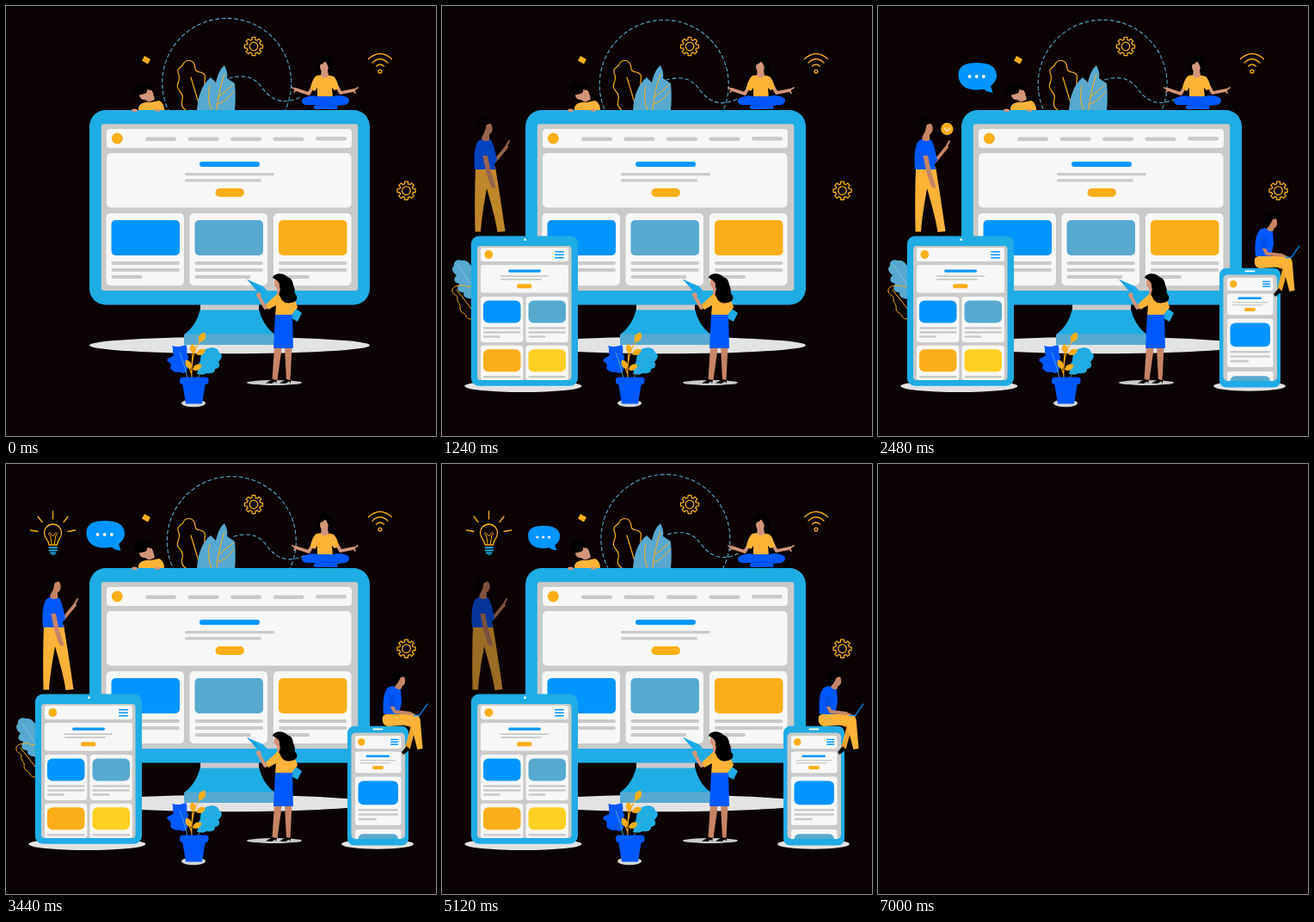
An HTML page that plays this animation: 500x500 px, repeating every 7.04 s.

```html
<!DOCTYPE html>
<html lang="en">
<head>
<meta charset="utf-8">
<title>Responsive design</title>
<style>
html, body { margin: 0; width: 100%; height: 100%; overflow: hidden; background: #0b0203; }
svg { display: block; width: 100vw; height: 100vh; }
</style>
</head>
<body>
<svg id="stage" viewBox="0 0 500 500"></svg>
<script>
const LOOP = 7040, STEP = 40;
const CYAN = '#20ace4', TEAL = '#57a9cf', SKY = '#0095ff', BLUE = '#0059ff', GOLD = '#fbae17',
  AMBER = '#fdb338', GREY = '#cacaca', PAPER = '#f7f7f7', SHADE = '#e3e3e3',
  SKIN = '#d3957a', TAN = '#c68566', HAIR = '#000';

// Shape helpers; boxes are given by their edges
const box = (x1, y1, x2, y2, fill, r = 0) =>
  `<rect x="${x1}" y="${y1}" width="${x2 - x1}" height="${y2 - y1}" rx="${r}" fill="${fill}"/>`;
const pill = (x1, y1, x2, y2, fill = GREY) => box(x1, y1, x2, y2, fill, (y2 - y1) / 2);
const oval = (x, y, rx, ry, fill) => `<ellipse cx="${x}" cy="${y}" rx="${rx}" ry="${ry}" fill="${fill}"/>`;
const dot = (x, y, r, fill) => oval(x, y, r, r, fill);
const ring = (x, y, r) => `<circle cx="${x}" cy="${y}" r="${r}" fill="none" stroke="${GOLD}" stroke-width="1.3"/>`;
const shape = (d, fill) => `<path d="${d}" fill="${fill}"/>`;
const line = (d, color, w = 1.2, extra = '') =>
  `<path d="${d}" fill="none" stroke="${color}" stroke-width="${w}" stroke-linecap="round" stroke-linejoin="round" ${extra}/>`;
const group = (id, ...parts) => `<g id="${id}">${parts.join('')}</g>`;

function gear(cx, cy) {
  const pts = [];
  for (let i = 0; i < 8; i++) {
    for (const [da, r] of [[-15, 8], [-10, 10.7], [10, 10.7], [15, 8]]) {
      const a = (i * 45 + da) * Math.PI / 180;
      pts.push(`${(cx + r * Math.cos(a)).toFixed(2)} ${(cy + r * Math.sin(a)).toFixed(2)}`);
    }
  }
  return line(`M${pts.join('L')}Z`, GOLD, 1.3) + ring(cx, cy, 4.8);
}

const leaf = (x, y, angle, len, w, fill) =>
  `<path transform="translate(${x} ${y}) rotate(${angle})" fill="${fill}"
    d="M0 0C${-w} ${-len * .3} ${-w} ${-len * .7} 0 ${-len}C${w} ${-len * .7} ${w} ${-len * .3} 0 0Z"/>`;

const menu = (x1, x2, y, gap) => [0, 1, 2].map(i => pill(x1, y + i * gap, x2, y + 1.4 + i * gap, SKY)).join('');

const orbit = () => group('orbit',
  line('M193 124A75 75 0 1 1 326 124', TEAL, 1.1, 'stroke-dasharray="4 3.4"'),
  line('M262 84C280 79 291 83 299 93C309 107 322 117 345 106', TEAL, 1.1, 'stroke-dasharray="4 3.4"'));

const backLeaves = () =>
  line('M209 121C198 113 211 108 202 99C195 91 204 88 201 80C197 72 204 72 206 68C208 62 217 62 219 68C221 72 218 76 226 77C235 79 230 85 231 91C233 99 225 101 228 107C231 113 225 117 224 121', GOLD) +
  line('M215 83L225 116', GOLD) +
  shape('M222 122C223 106 227 92 238 83L244 89C246 80 249 73 254 69C257 75 258 80 257 84L266 90C267 101 267 111 266 122Z', TEAL) +
  line('M237 93C234 105 236 113 239 121M254 79C249 94 246 108 245 121M247 106L264 92M246 114C253 112 259 107 265 99', GOLD, 1);

const peeker = () =>
  dot(158, 97, 9, HAIR) +
  shape('M154 121C153 115 159 111 168 112L178 110C182 112 184 116 184 121Z', AMBER) +
  shape('M155 103C157 98 163 96 168 97C172 100 171 104 173 108C169 112 165 112 162 109C158 109 155 107 155 103Z', SKIN) +
  shape('M150 99C154 88 166 88 170 94C172 97 168 99 164 97C165 102 161 102 157 103C153 104 150 102 150 99Z', HAIR) +
  oval(149.5, 121.3, 3.3, 1.9, SKIN) + oval(176, 121.2, 3, 1.6, SKIN);

const yogi = () =>
  shape('M364 64C365 56 376 56 379 63C382 69 379 75 381 80C382 85 379 89 374 87L365 80C362 74 362 69 364 64Z', HAIR) +
  line('M358 92L352 102L337 97M384 92L389 101L404 98', SKIN, 3.8) +
  line('M337 97L333 95M337 98L335 100M404 98L409 95M404 98L406 101', SKIN, 1.7) +
  shape('M361 81C366 80 376 80 381 82C385 86 386 91 387 96L382 98L379 95L380 107L362 107L362 95L359 99L354 96C355 90 357 84 361 81Z', AMBER) +
  shape('M367 74L374 74L375 81C373 84 368 84 366 81Z', SKIN) +
  oval(370, 71, 4.9, 6.5, SKIN) +
  shape('M364 68C364 59 377 58 378 67C378 74 376 78 375 76C376 71 373 67 371 64C369 67 367 68 364 68Z', HAIR) +
  shape('M362 105C356 103 350 105 346 107C342 110 344 114 349 115L360 115C357 117 357 119 360 120L384 120C387 119 386 117 384 116L394 115C399 114 400 110 398 107C393 104 386 103 381 105Z', BLUE) +
  line('M361 116L372 113L383 116', '#0047d6', .8);

const wifi = () =>
  line('M421.5 61.5Q435 49.5 448.5 61.5M426 66Q435 57.5 444 66M430.5 70Q435 66 439.5 70', GOLD, 1.3) + ring(435, 76, 1.9);

const monitorCard = (x, fill, end) =>
  box(x, 241, x + 90.5, 325, PAPER, 5) + box(x + 6, 249, x + 85.5, 290, fill, 5) +
  pill(x + 6, 297, x + 85.5, 301) + pill(x + 6, 305, x + 85.5, 309) + pill(x + 6, 313, end, 317);

const monitor = () =>
  oval(260, 394.5, 163, 9.7, SHADE) +
  shape('M226 352C223 365 217 375 207 382L313 382C303 375 297 365 294 352Z', CYAN) +
  box(207, 381.5, 313, 394, TEAL, 1.5) + box(226, 346, 294, 353.5, GREY) +
  box(97, 121, 423, 347.5, CYAN, 19) + box(110.8, 137.3, 409.3, 331, GREY, 3) +
  box(117, 143, 402, 165, PAPER, 4) + dot(129.3, 154, 6.5, GOLD) +
  [162, 211.5, 261, 310.5, 360].map((x, i) => pill(x, i < 4 ? 152.5 : 152, x + 36, i < 4 ? 157 : 156.5)).join('') +
  box(117, 171, 401.5, 234.5, PAPER, 5) + pill(225, 181, 295, 187, SKY) +
  pill(208, 194, 312, 197.2) + pill(208, 201.3, 297, 204.5) + pill(243.5, 212, 277, 222, GOLD) +
  monitorCard(116.5, SKY, 158.5) + monitorCard(213.5, TEAL, 284.5) + monitorCard(311, GOLD, 353);

const presenter = () =>
  oval(312, 438, 32, 3, GREY) +
  shape('M312 396L321 396L315.5 435L309.5 435ZM324 396L332.5 396L330.5 435L326 435Z', TAN) +
  shape('M302 438.5L310 434L315 435L314 439L313 436.5L309 439ZM318 438.5L326 434L331 435L331 439L329.5 436.5L325 439Z', HAIR) +
  shape('M280.5 318L299 326L307 335L298 341L292 332Z', CYAN) +
  line('M281 318.5L299 334', SKY, 1) +
  shape('M330 347L344 357L339 367L328 361Z', CYAN) +
  line('M293 336L301.5 351L307 347', SKIN, 3.8) + dot(294, 336, 2.7, SKIN) +
  shape('M315 335C321 333 328 334 332 338L335 350L332 360L313 360L314 348L305 353L302 347Z', AMBER) +
  line('M334 343L337 350L331 357', AMBER, 4) +
  shape('M313 359L333 359L334 398L311 398Z', BLUE) +
  shape('M315 326L321 326L322 334C319 337 316 336 315 334Z', SKIN) + oval(316.2, 321.5, 4.5, 6.5, SKIN) +
  shape('M310 316C312 310 323 310 327 315C334 317 333 322 335 327C337 331 334 333 338 337C340 343 334 345 331 345C326 347 320 343 319 338C315 335 321 330 318 327C319 322 316 319 310 316Z', HAIR);

const plant = () =>
  oval(218, 461.8, 14, 4.4, '#d2d6d6') +
  shape('M193 395C198 397 204 396 209 394C212 398 209 403 211 406C215 409 208 413 211 418C212 423 210 427 206 427C202 425 197 427 194 424C188 422 195 417 189 414C184 410 192 409 195 406C193 402 195 399 193 395Z', BLUE) +
  shape('M222 428C224 423 222 418 226 413C226 408 227 400 235 398C241 396 247 398 248 403C254 406 249 412 247 414C250 418 247 422 243 422C244 427 236 428 233 427C229 430 226 428 222 428Z', CYAN) +
  line('M202 403C206 413 209 424 211 433M241 406C233 412 227 422 223 433', TEAL, .9) +
  line('M216 433C215 415 218 399 228 386M216 420L217 400M216 428L211 416', GOLD, 1.1) +
  leaf(225, 391, 27, 13, 5, GOLD) + leaf(218, 404, -8, 11, 4.5, GOLD) +
  leaf(221, 405, 65, 12, 4.5, GOLD) + leaf(215, 422, -28, 12, 4.5, GOLD) + leaf(217, 423, 62, 12, 4.5, GOLD) +
  box(202, 431.5, 235.5, 440, BLUE, 3.5) + shape('M205 438L232 438L228 462.5L209 462.5Z', BLUE);

const sprig = () => group('sprig',
  shape('M38 341C31 340 24 340 25 333C17 333 17 327 20 323C12 321 14 316 17 313C11 309 11 304 14 302C13 296 19 294 23 296C28 295 31 298 33 301L38 306Z', TEAL) +
  line('M19 302L36 328', '#8cc8e4', .8) +
  line('M34 326C27 328 29 324 23 325C16 325 11 327 12 332C13 337 18 335 18 340C17 345 22 346 21 351C21 358 27 356 28 361C30 364 32 364 35 364M17 330L34 352', GOLD, 1));

const tabletCard = (x, y, fill, bottom) =>
  box(x, y, x + 49.3, bottom, PAPER, 3.5) + box(x + 3, y + 4.5, x + 46.5, y + 30.5, fill, 6) +
  pill(x + 3, y + 35.3, x + 46.5, y + 37.8);

const tablet = () => group('tablet',
  oval(94.3, 442, 68, 7, SHADE),
  box(33.8, 267.5, 158, 441.7, CYAN, 9), dot(96.5, 271.7, 1.4, '#fff'),
  box(41, 279, 150.5, 435, GREY, 4),
  box(45, 281, 147, 297, PAPER, 3), dot(54.3, 289, 4.9, GOLD), menu(131, 142, 285, 3.5),
  box(45, 301, 147, 333.5, PAPER, 3), pill(77, 306.5, 115, 309.7, SKY),
  pill(67.5, 313.3, 124, 315), pill(68, 317, 116, 318.7), pill(87, 323.2, 104.5, 328.3, GOLD),
  tabletCard(45, 338, SKY, 391), tabletCard(97.5, 338, TEAL, 391),
  pill(48, 378.3, 91.5, 380.8), pill(48, 383.3, 68, 385.8),
  pill(100.5, 378.3, 144, 380.8), pill(100.5, 383.3, 120.5, 385.8),
  tabletCard(45, 394.7, GOLD, 435), tabletCard(97.5, 394.7, '#ffd022', 435));

const man = () => group('man',
  line('M66 181L80 164', TAN, 3.6) + line('M79 165L83 157M79 165L81 160', TAN, 2) +
  shape('M44 188L67 187C71 211 75 238 78.5 262L69.5 263C67 246 61 226 57 212C54 229 51 247 50 262.5L43.5 262.5C43 238 43 212 44 188Z', AMBER) +
  shape('M47 157C51 154 58 153 62 156C66 163 67 171 69 179L66 184L67 190L43 190C42 178 42 164 47 157Z', BLUE) +
  line('M55 173L59 193L64 208', TAN, 5.5) + line('M64 207L65.5 210.5', TAN, 3) +
  shape('M50 172C50 164 58 162 59 171L58 174L51 174Z', BLUE) +
  shape('M53 146L60 147L60 156C57 158 53 157 51 155Z', TAN) + oval(58.5, 142.5, 5.2, 7.2, TAN) +
  shape('M48 136C50 129 62 129 64 135C61 138 57 136 56 140C56 144 54 148 52 151C48 147 46 141 48 136Z', HAIR));

const coin = () => group('coin', dot(80.3, 143, 7.2, GOLD), line('M77 142L80.3 145.3L83.7 142', '#fff1cf', 1.1));

const bubble = () => group('bubble',
  shape('M93.5 80C93.5 70 101 66 115 66C130 66 138 71 138 81C138 86 135 90 131 93L133.5 100.5C129 100.5 125 99 123.5 96.8C104 100 93.5 93 93.5 80Z', SKY),
  [106.5, 114.7, 122.8].map(x => dot(x, 82, 1.9, '#fff')).join(''));

const bulb = () => group('bulb',
  line('M50 94C50 88 44.5 87 44.5 80A10 10 0 0 1 64.5 80C64.5 87 59.5 88 59.5 94Z', GOLD, 1.3),
  line('M53 93L51.5 83C48 82 50 78 52 81L54.5 84L57 81C59 78 61 82 57.8 83L56.3 93', GOLD, 1),
  line('M54.5 55V64M37 61L42 67.5M28.5 77L37 78.5M72 61L67 67.5M80.5 77L72 78.5', GOLD, 1.3),
  line('M50.5 97.3H59M50.5 100.4H59M52 103.4H57.5', CYAN, 2), line('M54 105.5H56', CYAN, 1));

const phone = () => group('phone',
  oval(432, 442, 42, 5.7, SHADE),
  box(397, 304.7, 468, 443.5, CYAN, 8), pill(426.5, 307.5, 438.5, 309.2, '#fff'),
  box(401.5, 312.5, 464, 436, GREY, 5),
  box(406, 316, 459.5, 331, PAPER, 3), dot(413.2, 323.2, 4.2, GOLD), menu(447, 456.3, 319.7, 2.8),
  box(406, 334.5, 459.5, 359.3, PAPER, 3), pill(418.5, 338.5, 446, 341, SKY),
  pill(411.5, 344, 453.5, 345.2), pill(412, 347, 447.5, 348.2), pill(426, 350.9, 439, 355, GOLD),
  box(406, 363.5, 459.5, 420, PAPER, 3), box(409.5, 368.5, 456, 396.3, SKY, 6),
  pill(409.5, 401, 456, 403.5), pill(409.5, 406.3, 456, 408.8), pill(409.5, 411.7, 431, 414.2),
  shape('M406 436V428Q406 425 409 425H456.5Q459.5 425 459.5 428V436Z', PAPER),
  shape('M409.5 436Q410 430.3 416 430.3H449.5Q455.5 430.3 456 436Z', TEAL));

const sitter = () => group('sitter',
  line('M461 300L474 304L467 330', '#f0a52c', 6) + shape('M466 328L460 335L462 338L470 332Z', HAIR) +
  shape('M438 295C438 290 447 290 454 291L473 291C480 291 482 295 482 301L484.5 331L478.5 332.5L471 303L444 305C439 304 437 300 438 295Z', AMBER) +
  shape('M477 332L485 331L490 335L478 336Z', HAIR) +
  shape('M444 260C449 257 456 258 459 262L460 277L457 291L439 291C438 280 438 267 444 260Z', BLUE) +
  line('M448 280L452 288L470 290', TAN, 3.8) + line('M470 290L474 291', TAN, 2.3) +
  shape('M445 274C445 267 452 267 453 273L452 282L446 282Z', '#0050e6') +
  line('M474 292.5H480.5L490 279', SKY, 1.3) +
  shape('M453 252L460 252L460 261C457 263 454 262 452 259Z', TAN) + oval(459.3, 252, 4.9, 6.8, TAN) +
  shape('M450 246C450 240 464 239 468 244C469 248 463 247 459 248C457 252 455 256 452 259C448 257 447 250 450 246Z', HAIR));

const stage = document.getElementById('stage');
stage.innerHTML = group('scene',
  orbit(), gear(288, 47), gear(465.5, 214.7), wifi(),
  shape('M161 58L168 62L165 67.5L158 63.5Z', GOLD),
  backLeaves(), monitor(), peeker(), yogi(), presenter(), plant(),
  sprig(), man(), tablet(), phone(), sitter(), coin(), bubble(), bulb());

// Times: in start, in end, out start, out end
const actors = [
  { id: 'tablet', at: [160, 560, 5400, 5800], pivot: [93.5, 443] },
  { id: 'sprig', at: [560, 900, 4640, 5000], slide: 24 },
  { id: 'man', at: [940, 1340, 4960, 5360], slide: -20, fade: true },
  { id: 'phone', at: [1480, 1880, 6080, 6480], pivot: [432, 443] },
  { id: 'sitter', at: [1900, 2300, 5760, 6120], slide: 20, fade: true },
  { id: 'bubble', at: [2120, 2400, 5080, 5320], pivot: [133, 100] },
  { id: 'coin', at: [2320, 2460, 2640, 2800], pivot: [80.3, 143] },
  { id: 'bulb', at: [2760, 3080, 5120, 5400], pivot: [54.5, 104] }
].map(a => ({ ...a, el: document.getElementById(a.id) }));
const scene = document.getElementById('scene'), path = document.getElementById('orbit');

const ramp = (t, a, b) => Math.min(1, Math.max(0, (t - a) / (b - a)));

function draw(t) {
  scene.style.display = t >= LOOP - STEP ? 'none' : '';
  const a = t / LOOP * 2 * Math.PI;
  path.setAttribute('transform', `translate(${-2.8 * Math.cos(a)} ${2.2 * Math.sin(a)})`);
  for (const { el, at, pivot, slide, fade } of actors) {
    let k = ramp(t, at[0], at[1]) * (1 - ramp(t, at[2], at[3]));
    if (el.id === 'sitter' && t > at[2]) k = 1 - ramp(t, at[2], at[3]);
    el.style.display = k > 0 ? '' : 'none';
    if (pivot) {
      const [x, y] = pivot;
      el.setAttribute('transform', `translate(${x} ${y}) scale(${k}) translate(${-x} ${-y})`);
    } else {
      el.setAttribute('transform', `translate(${slide * (1 - k)} 0)`);
    }
    if (fade) el.setAttribute('opacity', k);
  }
}

const start = performance.now();
function tick() {
  const t = (performance.now() - start) % LOOP;
  draw(Math.floor(t / STEP) * STEP);
  requestAnimationFrame(tick);
}
draw(0);
requestAnimationFrame(tick);
</script>
</body>
</html>
```
